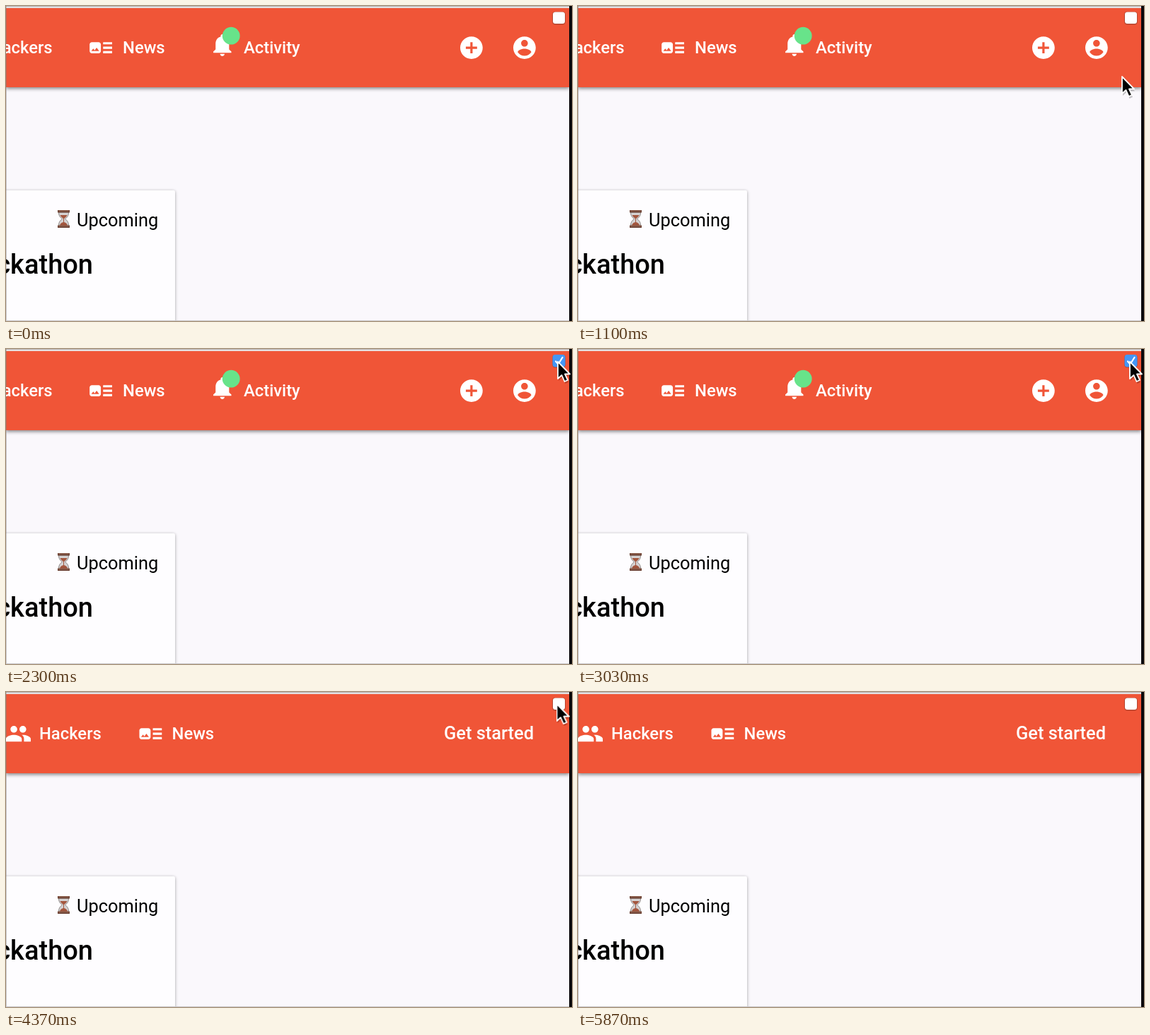
An HTML page for the animation above (5910 ms loop, 800x446 px).

```html
<!DOCTYPE html>
<html lang="en">
<head>
<meta charset="utf-8">
<title>Account bar toggle</title>
<style>
  html, body { margin: 0; width: 100%; height: 100%; overflow: hidden; }
  .stage {
    position: relative; width: 800px; height: 446px; overflow: hidden;
    background: #faf8fc; --loop: 5910ms;
  }
  .stage > * { position: absolute; }
  .top { left: 0; top: 0; width: 796px; height: 3px; background: linear-gradient(#b9b5b7 1px, #f4efef 1px); }
  .bar {
    left: 0; top: 3px; width: 796px; height: 112px; background: #f05537;
    box-shadow: 0 2px 5px rgba(0, 0, 0, .48);
  }
  .card {
    left: -40px; top: 261px; width: 279px; height: 220px; background: #fefdff;
    border-radius: 2px; box-shadow: 0 1px 4px rgba(0, 0, 0, .36);
  }
  .left { left: 0; top: 0; width: 1px; height: 446px; background: rgba(120, 115, 120, .4); }
  .foot { left: 0; top: 445px; width: 796px; height: 1px; background: #cbc9cc; }
  .edge { left: 796px; top: 0; width: 4px; height: 446px; background: #0b090b; }
  svg { left: 0; top: 0; font-family: Roboto, sans-serif; }
  .nav { fill: #fff; font-size: 23.8px; font-weight: 500; }

  .member, .guest, .tick { animation: var(--loop) step-end infinite; }
  .member { animation-name: member; }
  .guest { animation-name: guest; }
  .tick { animation-name: tick; }
  .pointer { animation: travel var(--loop) infinite; }

  @keyframes member { 0% { opacity: 1; } 59.2%, 100% { opacity: 0; } }
  @keyframes guest { 0% { opacity: 0; } 59.2%, 100% { opacity: 1; } }
  @keyframes tick { 0% { opacity: 0; } 38.9% { opacity: 1; } 59.2%, 100% { opacity: 0; } }
  @keyframes travel {
    0%, 13.5% { transform: translate(808px, 158px); animation-timing-function: ease-out; }
    18.4%, 20.8% { transform: translate(769px, 100px); animation-timing-function: ease-in-out; }
    27%, 31% { transform: translate(780px, 26px); animation-timing-function: ease-in-out; }
    35.5%, 55% { transform: translate(780px, 18px); animation-timing-function: ease-in-out; }
    58%, 85% { transform: translate(778.5px, 17px); animation-timing-function: ease-in; }
    91%, 100% { transform: translate(808px, 52px); }
  }
</style>
</head>
<body>
<div class="stage">
  <div class="top"></div>
  <div class="bar"></div>
  <div class="card"></div>
  <div class="left"></div>
  <div class="foot"></div>
  <div class="edge"></div>

  <svg width="800" height="446" viewBox="0 0 800 446">
    <defs>
      <path id="news" d="M22 13h-8v-2h8v2zm0-6h-8v2h8V7zm-8 10h8v-2h-8v2zm-2-8v6c0 1.1-.9 2-2 2H4c-1.1 0-2-.9-2-2V9c0-1.1.9-2 2-2h6c1.1 0 2 .9 2 2zm-1.5 6l-2.25-3-1.75 2.26-1.25-1.51L3.5 15h7z"/>
    </defs>

    <!-- signed in -->
    <g class="nav member">
      <text x="65.6" y="67.4" text-anchor="end">Hackers</text>
      <use href="#news" transform="translate(115 40) scale(1.59)"/>
      <text x="165" y="67.4">News</text>
      <path transform="translate(286.7 36) scale(1.59)" d="M12 22c1.1 0 2-.9 2-2h-4c0 1.1.89 2 2 2zm6-6v-5c0-3.07-1.64-5.64-4.5-6.32V4c0-.83-.67-1.5-1.5-1.5s-1.5.67-1.5 1.5v.68C7.63 5.36 6 7.92 6 11v5l-2 2v1h16v-1l-2-2z"/>
      <circle cx="318.2" cy="42.2" r="12.4" fill="#68e38a"/>
      <text x="336" y="67.4">Activity</text>
      <path transform="translate(638.8 40) scale(1.59)" d="M12 2C6.48 2 2 6.48 2 12s4.48 10 10 10 10-4.48 10-10S17.52 2 12 2zm5 11h-4v4h-2v-4H7v-2h4V7h2v4h4v2z"/>
      <path transform="translate(713.8 40) scale(1.59)" d="M12 2C6.48 2 2 6.48 2 12s4.48 10 10 10 10-4.48 10-10S17.52 2 12 2zm0 3c1.66 0 3 1.34 3 3s-1.34 3-3 3-3-1.34-3-3 1.34-3 3-3zm0 14.2c-2.5 0-4.71-1.28-6-3.22.03-1.99 4-3.08 6-3.08 1.99 0 5.97 1.09 6 3.08-1.29 1.94-3.5 3.22-6 3.22z"/>
    </g>

    <!-- signed out -->
    <g class="nav guest">
      <path transform="translate(-1.6 40) scale(1.59)" d="M16 11c1.66 0 2.99-1.34 2.99-3S17.66 5 16 5c-1.66 0-3 1.34-3 3s1.34 3 3 3zm-8 0c1.66 0 2.99-1.34 2.99-3S9.66 5 8 5C6.34 5 5 6.34 5 8s1.34 3 3 3zm0 2c-2.33 0-7 1.17-7 3.5V19h14v-2.5c0-2.33-4.67-3.5-7-3.5zm8 0c-.29 0-.62.02-.97.05 1.16.84 1.97 1.97 1.97 3.45V19h6v-2.5c0-2.33-4.67-3.5-7-3.5z"/>
      <text x="134.8" y="67.4" text-anchor="end">Hackers</text>
      <use href="#news" transform="translate(185.3 40) scale(1.59)"/>
      <text x="234.5" y="67.4">News</text>
      <text x="746" y="67.4" text-anchor="end" font-size="25.4">Get started</text>
    </g>

    <!-- hourglass -->
    <g transform="translate(72 289)">
      <path d="M2.5 3h14c0 5-1.5 7-5 9.500c3.500 2.500 5 4.500 5 9.500h-14c0-5 1.500-7 5-9.500c-3.500-2.500-5-4.500-5-9.500z" fill="#d5d2d2" stroke="#8f8987"/>
      <path d="M4.500 7h10c-1 2.500-3 4-5 5.200c-2-1.200-4-2.700-5-5.200zM9 12h1v5c3 .8 4.500 2.500 5 5h-11c.5-2.500 2-4.200 5-5z" fill="#a4573f"/>
      <path d="M1 0h17v3.500h-17zM1 21.500h17v3.500h-17z" fill="#6d4235"/>
      <path d="M2 1h15M2 22.500h15" stroke="#9c6c58"/>
    </g>
    <text x="215.2" y="312" text-anchor="end" font-size="25.4">Upcoming</text>
    <text x="123" y="379" text-anchor="end" font-size="38" font-weight="500">Hackathon</text>

    <!-- checkbox -->
    <rect x="772" y="8" width="19" height="18.500" rx="4.500" fill="#8e3c2b" opacity=".6"/>
    <rect x="773" y="8.500" width="17" height="16.500" rx="3.500" fill="#fff"/>
    <g class="tick">
      <rect x="772.500" y="8" width="18" height="17.500" rx="4" fill="#4596f5"/>
      <path d="M777 17.500l3.500 4 6-9.500" fill="none" stroke="#fff" stroke-width="2.200" stroke-linecap="round" stroke-linejoin="round"/>
    </g>

    <g class="pointer">
      <path d="M1 3v24l5.500-5 4 9 4.500-2-4-8.500h7z" fill="#000" opacity=".22"/>
      <path d="M0 0v24l5.500-5 4 9 4.500-2-4-8.500h7z" fill="#000" stroke="#fff" stroke-width="1.800" stroke-linejoin="round"/>
    </g>
  </svg>
</div>
</body>
</html>
```
